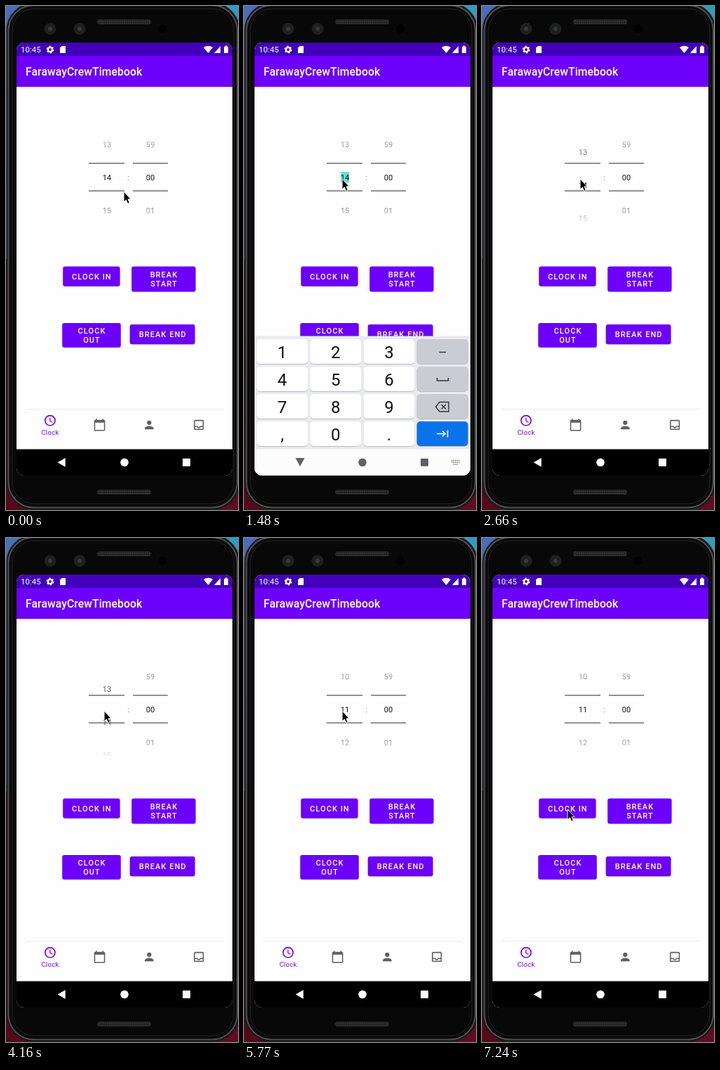
Animation, 331 px wide and 717 px high, one loop 8000 ms. Source, as an HTML page:

```html
<!DOCTYPE html>
<html lang="en">
<head>
<meta charset="utf-8">
<title>Time clock app</title>
<style>
html, body { margin: 0; width: 100%; height: 100%; overflow: hidden; background: #000; }
svg { display: block; width: 331px; height: 717px; font-family: Roboto, sans-serif; }
.mid { text-anchor: middle; }
.btn { font-weight: 500; font-size: 11px; letter-spacing: 1.05px; fill: #fff; }
</style>
</head>
<body>
<svg id="stage" viewBox="0 0 331 717">
  <defs>
    <linearGradient id="sky"><stop stop-color="#4a6cb8"/><stop offset="1" stop-color="#2f9cc0"/></linearGradient>
    <linearGradient id="dusk"><stop stop-color="#560818"/><stop offset="1" stop-color="#640a24"/></linearGradient>
    <linearGradient id="fade" gradientUnits="userSpaceOnUse" x1="0" y1="173" x2="0" y2="315">
      <stop offset="0" stop-color="#000"/><stop offset=".42" stop-color="#fff"/>
      <stop offset=".58" stop-color="#fff"/><stop offset="1" stop-color="#000"/>
    </linearGradient>
    <mask id="drum" maskUnits="userSpaceOnUse" x="100" y="177" width="150" height="134">
      <rect x="100" y="177" width="150" height="134" fill="url(#fade)"/>
    </mask>
    <pattern id="mesh" width="3" height="3" patternUnits="userSpaceOnUse">
      <rect width="3" height="3" fill="#242424"/><rect width="1.5" height="1.5" fill="#383838"/>
    </pattern>
    <clipPath id="screen"><rect x="15" y="52" width="308" height="616" rx="11"/></clipPath>
  </defs>

  <!-- phone body -->
  <rect width="331" height="360" fill="url(#sky)"/>
  <rect y="360" width="331" height="357" fill="url(#dusk)"/>
  <rect x="1.5" y="-3.500" width="331" height="719.500" rx="38" fill="#0b0b0b" stroke="#1c1c1c" stroke-width="2"/>
  <rect x="3.500" y="-1" width="326.500" height="714.500" rx="36" fill="#0a0a0a" stroke="#505050" stroke-width="2"/>
  <rect x="9" y="4" width="316" height="704" rx="31" fill="#080808" stroke="#242424"/>
  <g fill="url(#mesh)"><rect x="130" y="19" width="77" height="7" rx="3.5"/><rect x="130" y="688" width="77" height="7" rx="3.5"/></g>
  <g fill="#1d1f21"><circle cx="63" cy="32.5" r="8.5"/><circle cx="105" cy="32.5" r="8.5"/></g>
  <g fill="#343a3d"><circle cx="63" cy="32.5" r="3"/><circle cx="105" cy="32.5" r="3"/></g>
  <circle cx="223" cy="32.5" r="6" fill="#000"/>

  <g clip-path="url(#screen)">
    <rect x="15" y="52" width="308" height="616" fill="#fefefe"/>
    <rect x="15" y="52" width="308" height="19" fill="#4200ba"/>
    <rect x="15" y="71" width="308" height="44" fill="#6c00fa"/>
    <g fill="#fff">
      <text x="21" y="66" font-size="11.500">10:45</text>
      <circle cx="63" cy="62" r="3.1" fill="none" stroke="#fff" stroke-width="2.4"/>
      <circle cx="63" cy="62" r="4.6" fill="none" stroke="#fff" stroke-width="1.6" stroke-dasharray="2.4 2.42"/>
      <path d="M79.500 57H85V67H77V59.500Z"/>
      <path d="M282 59Q288.500 54.500 295 59L288.500 67ZM306 57V67H297ZM311 58h1.500v-1.500h3V58H317V67H311Z"/>
      <text x="28" y="99" font-size="15.700" font-weight="500" letter-spacing=".1">FarawayCrewTimebook</text>
    </g>

    <!-- time picker -->
    <rect id="mark" x="138" y="236" width="12" height="15.500" fill="#70dcd2"/>
    <g id="nums" class="mid" mask="url(#drum)" font-size="11" fill="#111"></g>
    <text class="mid" x="174.500" y="247.500" font-size="11" fill="#777">:</text>
    <path d="M118 223.800H169M181 223.800H231M118 263H169M181 263H231" stroke="#707070" stroke-width="1.500"/>

    <g id="buttons" class="mid btn"></g>

    <!-- tab bar -->
    <path d="M28 573.500H311" stroke="#eee"/>
    <g fill="none" stroke="#6c00fa" stroke-width="1.600"><circle cx="62.900" cy="589.700" r="7.100"/><path d="M62.800 585.500V590.200L66.300 592.300" stroke-width="1.300"/></g>
    <text class="mid" x="63" y="610" font-size="9.500" letter-spacing=".3" fill="#6c00fa">Clock</text>
    <g fill="#606060">
      <path transform="translate(124.100 586.500) scale(.786)" d="M20 3h-1V1h-2v2H7V1H5v2H4a2 2 0 0 0-2 2v16a2 2 0 0 0 2 2h16a2 2 0 0 0 2-2V5a2 2 0 0 0-2-2zm0 18H4V8h16z"/>
      <path transform="translate(194.900 586.500) scale(.786)" d="M12 12a4 4 0 1 0 0-8 4 4 0 0 0 0 8zm0 2c-2.700 0-8 1.300-8 4v2h16v-2c0-2.700-5.300-4-8-4z"/>
      <path transform="translate(265.700 586.500) scale(.786)" d="M19 3H5a2 2 0 0 0-2 2v14a2 2 0 0 0 2 2h14a2 2 0 0 0 2-2V5a2 2 0 0 0-2-2zm0 16H5v-3h3.560a4 4 0 0 0 6.900 0H19zm0-5h-5a2 2 0 0 1-4 0H5V5h14z"/>
    </g>

    <rect x="15" y="630.500" width="308" height="38" fill="#000"/>

    <g id="board">
      <rect x="15" y="469.500" width="308" height="400" fill="#e9eaee"/>
      <rect x="15" y="630.500" width="308" height="240" fill="#fcfcfc"/>
      <g id="keys" class="mid" font-size="24" fill="#111"></g>
      <g fill="none" stroke="#333" stroke-width="1.600">
        <path d="M278.500 492.500H288"/>
        <path d="M275.500 529V533H291.500V529"/>
        <path d="M279 563.500H292V577H279L273.500 570.200ZM281.500 567L288 573.500M288 567L281.500 573.500" stroke-width="1.400"/>
        <path d="M275 608.500H287M283 604.500L287 608.500L283 612.500M290.500 603.500V613.500" stroke="#fff"/>
      </g>
    </g>

    <!-- system buttons -->
    <g id="sys">
      <path id="back"/>
      <circle cx="169" cy="649.300" r="5.800"/><rect x="252" y="643.800" width="11" height="11" rx="1"/>
      <path id="pad" d="M296 646.500H308.500M296 649H308.500M298.500 652H306" stroke-width="1.500" stroke-dasharray="1.500 1"/>
    </g>
  </g>

  <path id="cursor" d="M.5 1V15.800L3.800 12.800L6.100 18.200L8.600 17.100L6.400 11.800H10.500Z" fill="#000" stroke="#fff" stroke-width=".9" stroke-linejoin="round"/>
</svg>

<script>
const $ = id => document.getElementById(id);
const TICK = 147.9, LOOP = 8000, PITCH = 47;

function add(parent, tag, attrs, text = '') {
  const el = document.createElementNS('http://www.w3.org/2000/svg', tag);
  for (const a in attrs) el.setAttribute(a, attrs[a]);
  el.textContent = text;
  return parent.appendChild(el);
}

// Picker values
const hours = [];
for (let h = 9; h < 16; h++) hours.push({ h, el: add($('nums'), 'text', { x: 144 }, String(h).padStart(2, '0')) });
['59', '00', '01'].forEach((m, i) => add($('nums'), 'text', { x: 206, y: 201 + i * PITCH }, m));

function button(x, y, width, height, ...lines) {
  const box = { x, width, height, rx: 3 };
  add($('buttons'), 'rect', { ...box, y: y + .7, fill: '#0002' });
  add($('buttons'), 'rect', { ...box, y, fill: '#6c00fa' });
  lines.forEach((s, i) => add($('buttons'), 'text',
    { x: x + width / 2 + .5, y: y + height / 2 + 4 + (i - (lines.length - 1) / 2) * 13 }, s));
}
button(81.2, 370.6, 81.4, 28.2, 'CLOCK IN');
button(179.2, 370.6, 91.4, 36, 'BREAK', 'START');
button(80.2, 451, 83.6, 34.8, 'CLOCK', 'OUT');
button(176.7, 453, 92.9, 28.3, 'BREAK END');

['123', '456', '789', ',0.'].forEach((row, r) => {
  for (let c = 0; c < 4; c++) {
    const x = 18 + c * 76.2, y = 474 + r * 39;
    const fill = c < 3 ? '#fff' : r < 3 ? '#c9ccd3' : '#0a73ec';
    add($('keys'), 'rect', { x, y: y + 1, width: 73, height: 35, rx: 5, fill: '#b9bcc2' });
    add($('keys'), 'rect', { x, y, width: 73, height: 35, rx: 5, fill });
    if (c < 3) add($('keys'), 'text', { x: x + 36.5, y: y + 26.5 }, row[c]);
  }
});

// Keys are [tick, value, ...]
const wheel = [[13, 0], [14, 2], [18, 11], [20, 14], [22, 14], [23, 6], [24, 1], [28, 18], [30, 18], [31, 9],
  [32, 4], [33, 30], [34, 72], [35, 108], [36, 128], [37, 137], [38, 140], [39, 141]];
const pointer = [[0, 168, 263], [1, 152, 252], [2, 140, 245], [40, 140, 245], [41, 147, 264], [43, 179, 366],
  [44, 186, 405], [45, 168, 403], [47, 117, 389], [48, 122, 386], [49, 122, 385]];
const slide = [[6, 198, 0], [7, 147, .16], [8, 50, .7], [9, 10, .95], [10, 0, 1], [11, 40, .5], [12, 198, 0]];

function tween(keys, k) {
  const i = keys.findIndex(p => p[0] >= k);
  if (i < 1) return keys.at(i).slice(1);
  const a = keys[i - 1], b = keys[i], f = (k - a[0]) / (b[0] - a[0]);
  return a.slice(1).map((v, j) => v + (b[j + 1] - v) * f);
}

function draw(now) {
  const k = Math.floor((now % LOOP + 8) / TICK);

  const [turn] = tween(wheel, k);
  for (const { h, el } of hours) el.setAttribute('y', 248 + (h - 14) * PITCH + turn);
  $('mark').style.display = k >= 6 && k < 11 ? '' : 'none';

  const [drop, alpha] = tween(slide, k);
  $('board').setAttribute('transform', `translate(0 ${drop})`);
  $('board').setAttribute('opacity', alpha);
  const open = k > 7 && k < 11;
  $('sys').setAttribute('fill', open ? '#5f6165' : '#fff');
  $('back').setAttribute('d', open ? 'M73.500 643H86.500L80 655Z' : 'M84.700 643V655.700L73.500 649.300Z');
  $('pad').setAttribute('stroke', open ? '#77797d' : '#ddd');
  $('pad').style.display = alpha ? '' : 'none';

  const [x, y] = tween(pointer, k);
  $('cursor').setAttribute('transform', `translate(${x - .4} ${y})`);
  requestAnimationFrame(draw);
}
requestAnimationFrame(draw);
</script>
</body>
</html>
```
